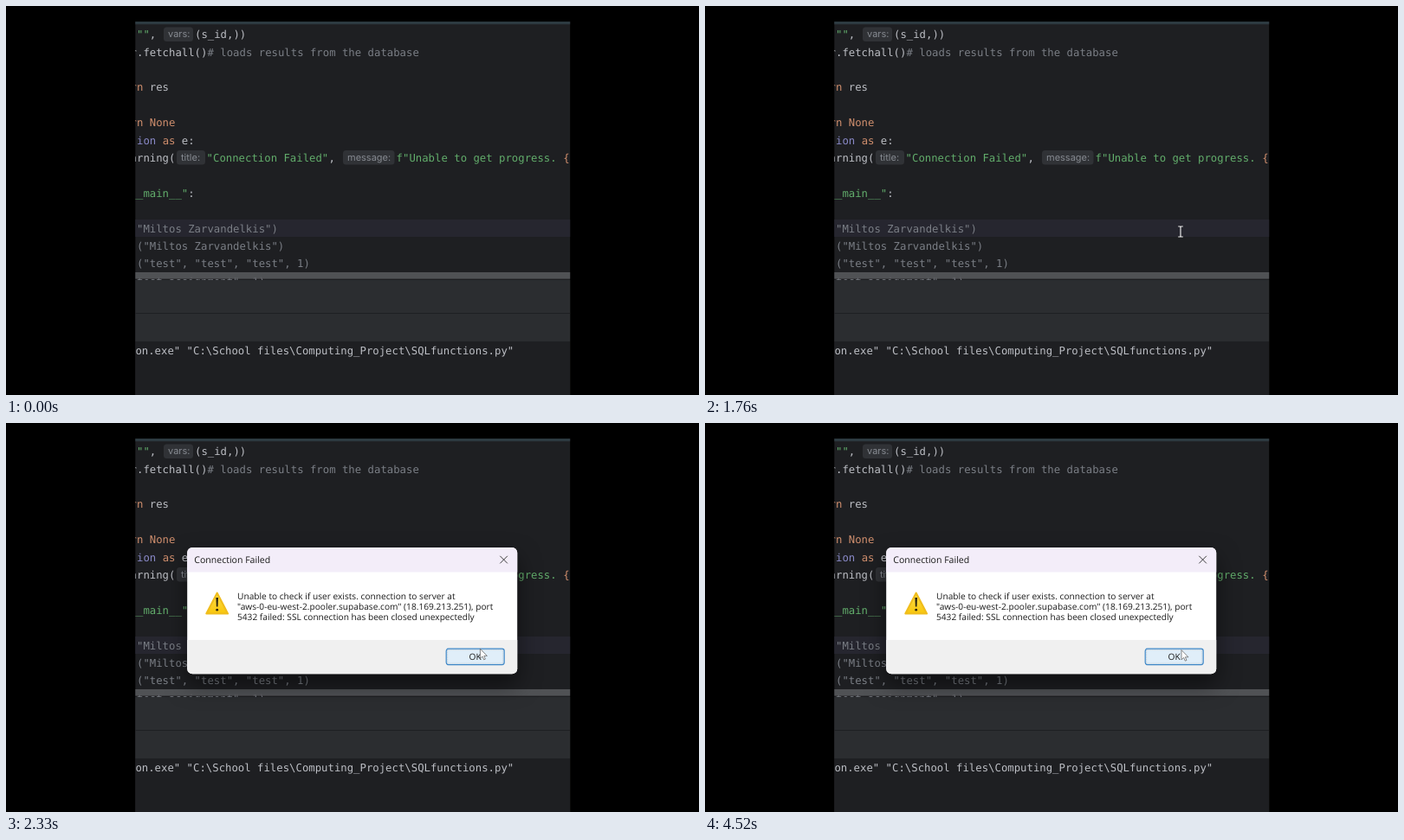
An HTML page that plays this animation: 800x450 px, repeating every 4.55 s.

```html
<!DOCTYPE html>
<html lang="en">
<head>
<meta charset="utf-8">
<title>Connection Failed</title>
<style>
  html, body { margin: 0; width: 100%; height: 100%; overflow: hidden; background: #000; }
  svg { display: block; width: 800px; height: 450px; }
  text { text-rendering: geometricPrecision; white-space: pre; }
  .code { font: 12.31px "DejaVu Sans Mono", monospace; fill: #bcbec4; }
  .str { fill: #62ad6b; }
  .key { fill: #cf8e6d; }
  .cls { fill: #8888c6; }
  .rem { fill: #7a7e85; }
  .hint rect { fill: #303236; }
  .hint text { font: 11px Inter, sans-serif; fill: #868a91; }
  .ui { font-family: "Open Sans", "Noto Sans", sans-serif; fill: #1a1a1a; }
  .message { font-size: 10.17px; font-weight: 500; }
  .shadow { filter: drop-shadow(0 12px 13px rgba(0, 0, 0, .5)); }
</style>
</head>
<body>
<svg viewBox="0 0 800 450">
  <defs>
    <clipPath id="screen"><rect x="149.3" y="18" width="501.9" height="432"/></clipPath>
    <clipPath id="frame"><rect x="209.2" y="144" width="381" height="146.2" rx="6"/></clipPath>
    <linearGradient id="amber" x1="0" y1="0" x2="0" y2="1">
      <stop offset="0" stop-color="#ffe04a"/>
      <stop offset="1" stop-color="#f8c60c"/>
    </linearGradient>
  </defs>
  <rect width="800" height="450"/>
  <g clip-path="url(#screen)">
    <rect x="149" y="18" width="503" height="432" fill="#1e1f22"/>
    <rect x="149" y="18" width="503" height="3.2" fill="#2d3a41"/>
    <rect x="149" y="247" width="503" height="20" fill="#26262f"/>

    <g id="code" class="code"></g>

    <g class="hint">
      <rect x="182" y="24.5" width="34" height="16.5" rx="3.5"/><text x="187" y="36">vars:</text>
      <rect x="197" y="167" width="33" height="16.5" rx="3.5"/><text x="202" y="178.6">title:</text>
      <rect x="389" y="167" width="59.5" height="16.5" rx="3.5"/><text x="394" y="178.6">message:</text>
    </g>
    <rect id="caret" x="313.2" y="248" width="1.7" height="18" fill="#e4e6ea"/>

    <rect x="149" y="308" width="503" height="7.6" fill="#5a5b5e" opacity=".85"/>
    <rect x="149" y="317" width="503" height="71" fill="#2b2d30"/>
    <rect x="149" y="355" width="503" height="1" fill="#1e1f22"/>
    <rect x="149" y="388" width="503" height="62" fill="#1e1f22"/>
    <text class="code" x="149.4" y="403.2">on.exe" "C:\School files\Computing_Project\SQLfunctions.py"</text>

    <g id="dialog" class="ui">
      <rect class="shadow" x="209.2" y="144" width="381" height="146.2" rx="6" fill="#fff"/>
      <g clip-path="url(#frame)">
        <rect x="209" y="144" width="382" height="28.5" fill="#f3edf9"/>
        <rect x="209" y="251" width="382" height="40" fill="#f0f0f0"/>
      </g>
      <text x="217.3" y="162" font-size="10.56">Connection Failed</text>
      <path d="M570.3 153.8l8.6 8.6m0-8.6l-8.6 8.6" stroke="#333" stroke-width=".95"/>
      <path d="M243.7 196.7L256 220.5H231.4Z" fill="url(#amber)" stroke="#f0bd1c" stroke-width="2.2" stroke-linejoin="round"/>
      <path d="M242.4 202h2.6l-.5 10.4h-1.6z" fill="#2b2410"/>
      <circle cx="243.7" cy="216.2" r="1.4" fill="#2b2410"/>
      <g class="message">
        <text x="267" y="203.9">Unable to check if user exists. connection to server at</text>
        <text x="267" y="216">"aws-0-eu-west-2.pooler.supabase.com" (18.169.213.251), port</text>
        <text x="267" y="228.1">5432 failed: SSL connection has been closed unexpectedly</text>
        <rect id="button" x="508.2" y="261.2" width="67" height="18.4" rx="2.5" stroke="#3f88c8" stroke-width="1.2"/>
        <rect x="509.6" y="262.6" width="64.2" height="15.6" fill="none" stroke="#555" stroke-width=".5" stroke-dasharray="1 1" opacity=".5"/>
        <text x="541.7" y="274.4" text-anchor="middle">OK</text>
      </g>
    </g>

    <path id="beam" d="M-2.8 -6H-.7L0 -5.3L.7 -6H2.8M0 -5.3V5.3M-2.8 6H-.7L0 5.3L.7 6H2.8" fill="none" stroke="#e8e8e8" stroke-width="1.2"/>
    <path id="arrow" d="M0 0V11.2L2.6 8.8L4.3 12.6L6 11.9L4.4 8.2H8Z" fill="#fff" stroke="#555" stroke-width=".7" stroke-linejoin="round"/>
  </g>
</svg>
<script>
const LOOP = 4550;
const OPEN = 2090, ARROW = 2120, HOVER = 2210;
const BLINK = { start: 60, half: 500, stop: 2060 };
const CELL = 7.41, LEFT = 151, TOP = 37.1, PITCH = 20.4;

// line number, then [class, text, x]; the first run starts one cell left of the edge
const lines = [
  [0, ['str', '"""'], ['', ','], ['', '(s_id,))', 218]],
  [1, ['', 'r.fetchall()'], ['rem', '# loads results from the database']],
  [3, ['key', 'rn '], ['', 'res']],
  [5, ['key', 'rn None']],
  [6, ['cls', ' ion '], ['key', 'as '], ['', 'e:']],
  [7, ['', 'arning('], ['str', '"Connection Failed"', 231.6], ['', ','],
      ['str', 'f"Unable to get progress. ', 450.6], ['key', '{']],
  [9, ['str', '__main__"'], ['', ':']],
  [11, ['rem', '("Miltos Zarvandelkis")']],
  [12, ['rem', ' ("Miltos Zarvandelkis")']],
  [13, ['rem', ' ("test", "test", "test", 1)']],
  [14, ['rem', '"test_assignment", 1)']],
];

// dialog opening: time, opacity, scale
const opening = [
  [OPEN, .15, .89], [2120, .59, .925], [2180, .93, .985], [2210, 1, .996], [2240, 1, 1],
];

// pointer: time, x, y
const track = [
  [620, 660, 45], [760, 622, 130], [900, 570, 232], [1020, 549, 261],
  [2060, 549, 261], [2120, 547.8, 261.5], [2330, 547.4, 261.2], [3120, 546.9, 261.2],
  [4250, 546.9, 261.2], [4520, 550, 262.6],
];

const $ = id => document.getElementById(id);
const show = (el, on) => el.setAttribute('visibility', on ? 'visible' : 'hidden');

function addLine([row, ...runs]) {
  const text = document.createElementNS('http://www.w3.org/2000/svg', 'text');
  text.setAttribute('y', TOP + row * PITCH);
  let x = LEFT - CELL;
  for (const [cls, str, at = x] of runs) {
    const run = document.createElementNS('http://www.w3.org/2000/svg', 'tspan');
    run.setAttribute('x', at);
    run.setAttribute('class', cls);
    run.textContent = str;
    text.append(run);
    x = at + str.length * CELL;
  }
  $('code').append(text);
}

function pointerAt(t) {
  const i = track.findIndex(p => p[0] > t);
  if (i < 0) return track[track.length - 1].slice(1);
  if (i === 0) return track[0].slice(1);
  const [t0, x0, y0] = track[i - 1], [t1, x1, y1] = track[i];
  const k = (t - t0) / (t1 - t0);
  return [x0 + (x1 - x0) * k, y0 + (y1 - y0) * k];
}

function draw(t) {
  const phase = Math.floor((t - BLINK.start) / BLINK.half);
  show($('caret'), t >= BLINK.start && t < BLINK.stop && phase % 2 === 0);

  const [, alpha, scale] = opening.filter(s => s[0] <= t).pop() || [0, 0, 1];
  $('dialog').setAttribute('opacity', alpha);
  $('dialog').setAttribute('transform', `translate(314 180) scale(${scale}) translate(-314 -180)`);
  $('button').setAttribute('fill', t >= HOVER ? '#e0eef9' : '#f4f4f4');

  const place = `translate(${pointerAt(t).join(' ')})`;
  for (const id of ['beam', 'arrow']) $(id).setAttribute('transform', place);
  show($('beam'), t >= track[0][0] && t < ARROW);
  show($('arrow'), t >= ARROW);
}

lines.forEach(addLine);
const start = performance.now();
function tick() {
  draw((performance.now() - start) % LOOP);
  requestAnimationFrame(tick);
}
tick();
</script>
</body>
</html>
```
